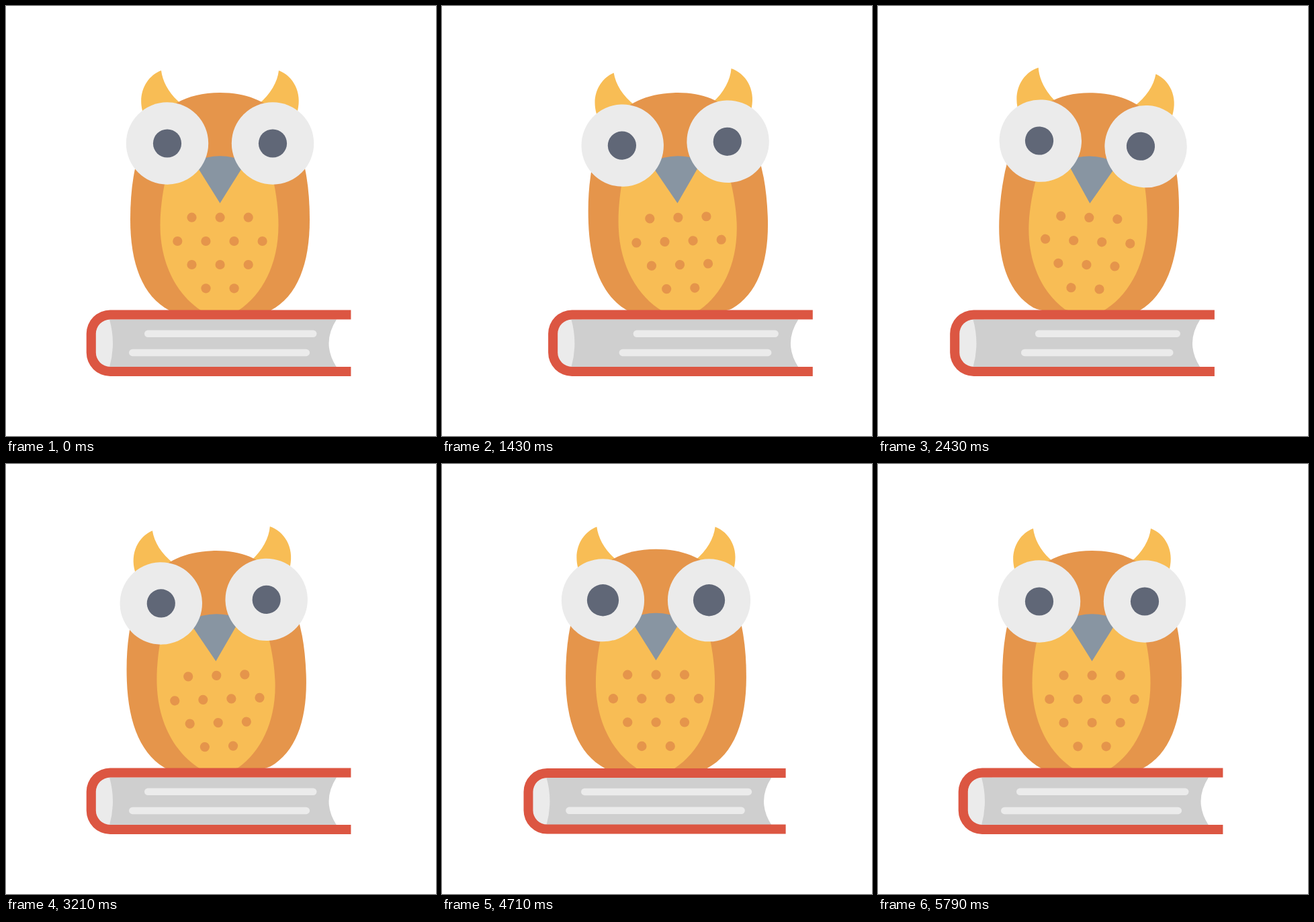
Recreate the animation shown at these times as an HTML page. Size 640 px wide and 640 px high, loop 6 s.

```html
<!DOCTYPE html>
<html lang="en">
<head>
<meta charset="utf-8">
<title>Owl on a book</title>
<style>
  html, body { margin: 0; width: 100%; height: 100%; overflow: hidden; background: #fff; }
  svg { display: block; width: 100%; height: 100%; }
  .orange { fill: #e5954b; }
  .yellow { fill: #f8bd55; }
  .pale { fill: #ebebeb; }
  .pupil { fill: #606777; }
  .rule { stroke: #ebebeb; stroke-width: 10.5; stroke-linecap: round; }
</style>
</head>
<body>
<svg viewBox="0 0 640 640">
  <g id="owl">
    <path id="ear" class="yellow" d="M231 96C210 104 196 128 203 156L250 165L261 146C243 131 233 113 231 96Z"/>
    <use href="#ear" transform="matrix(-1 0 0 1 637 0)"/>
    <path class="orange" d="M318.5 129C222 129 185 205 185 318C185 383 203 432 243 453C265 462 372 462 394 453C434 432 452 383 452 318C452 205 415 129 318.5 129Z"/>
    <path class="yellow" d="M243 235C234 268 229.5 300 229.5 326C229.5 385 255 430 290 453Q318 461 346 453C381 430 405.5 385 405.5 326C405.5 300 401 268 392 235Z"/>
    <g id="dots" class="orange"></g>
    <path fill="#8895a2" d="M280 232Q318.5 214.5 357 232L318.5 293.5Z"/>
    <circle class="pale" cx="240" cy="204.5" r="61.2"/>
    <circle class="pale" cx="397" cy="204.5" r="61.2"/>
    <circle id="pupilL" class="pupil" cy="204.5"/>
    <circle id="pupilR" class="pupil" cy="204.5"/>
  </g>
  <g id="book">
    <path class="pale" d="M170 465H155A23 23 0 0 0 132 488V516A23 23 0 0 0 155 539H170Z"/>
    <path fill="#cfcfcf" d="M154 466.5H492Q469 502 492 537.5H154Q164 502 154 466.5Z"/>
    <line id="ruleA" class="rule" x2="457.2" y1="487.8" y2="487.8"/>
    <line id="ruleB" class="rule" x2="446.8" y1="515.9" y2="515.9"/>
    <path fill="#dc5642" d="M513.4 452.5H155A35.3 35.3 0 0 0 119.7 487.8V515.7A35.3 35.3 0 0 0 155 551H513.4V536.9H155A21.2 21.2 0 0 1 133.8 515.7V487.8A21.2 21.2 0 0 1 155 466.6H513.4Z"/>
  </g>
</svg>
<script>
const LOOP = 6000, STEPS = 84;
const $ = id => document.getElementById(id);

// Belly dots: [first x, y, count]
for (const [x, y, n] of [[276.5, 314.7, 3], [255.3, 350, 4], [276.5, 385, 3], [297.5, 420.3, 2]]) {
  for (let i = 0; i < n; i++) {
    const dot = document.createElementNS('http://www.w3.org/2000/svg', 'circle');
    dot.setAttribute('cx', x + i * 42.1);
    dot.setAttribute('cy', y);
    dot.setAttribute('r', 7.1);
    $('dots').append(dot);
  }
}

const smooth = p => p * p * (3 - 2 * p);

// Cubic ease with handles (.4, 0) and (.5, 1)
function glide(p) {
  let lo = 0, hi = 1;
  for (let i = 0; i < 24; i++) {
    const s = (lo + hi) / 2;
    if (1.2 * s - 0.9 * s * s + 0.7 * s ** 3 < p) lo = s; else hi = s;
  }
  return smooth(lo);
}

// Value at time t along [time, value] keys
function track(keys, ease) {
  return t => {
    if (t <= keys[0][0]) return keys[0][1];
    for (let i = 1; i < keys.length; i++) {
      const [t0, v0] = keys[i - 1], [t1, v1] = keys[i];
      if (t < t1) return v0 + (v1 - v0) * ease((t - t0) / (t1 - t0));
    }
    return keys[keys.length - 1][1];
  };
}

// Tracks sharing the beats of the sliding book
const slide = (...v) =>
  track([0, 820, 1667, 2500, 3150].map((t, i) => [t, v[i]]), glide);
const pop = (peak, dip) =>
  track([[3775, 1], [4433, peak], [4833, dip], [5780, 1]], smooth);

const shift = slide(0, -51.2, 51.3, -13.2, 0);
const lookL = slide(0, -6.4, 0, -1.8, 0);
const lookR = slide(0, -6.5, 0, -7.7, 0);
const rule = slide(1, 0.726, 0.86, 0.842, 1);
const lean = track([[0, 0], [860, 6], [1775, -6], [2620, 4.5], [3250, -2.1], [3780, 0]], smooth);
const owlPop = pop(1.106, 0.98);
const bookPop = pop(1.05, 0.975);
const pupilPop = pop(1.53, 1);

const scaleAt = (s, x, y) => `translate(${x} ${y}) scale(${s}) translate(${-x} ${-y})`;

function draw(t) {
  const dx = shift(t), r = 21.1 * pupilPop(t), k = rule(t);
  $('owl').setAttribute('transform',
    `translate(${dx}) rotate(${lean(t)} 318.5 465) ${scaleAt(owlPop(t), 318.5, 465)}`);
  $('book').setAttribute('transform', `translate(${dx}) ${scaleAt(bookPop(t), 316.6, 501.8)}`);
  $('pupilL').setAttribute('cx', 240 + lookL(t));
  $('pupilR').setAttribute('cx', 397 + lookR(t));
  $('pupilL').setAttribute('r', r);
  $('pupilR').setAttribute('r', r);
  $('ruleA').setAttribute('x1', 462.5 - 256.5 * k + 5.25);
  $('ruleB').setAttribute('x1', 452 - 269 * k + 5.25);
}

// The motion runs at 14 steps per second
const start = performance.now();
function tick() {
  const t = (performance.now() - start) % LOOP;
  draw(Math.floor((t + 5) * STEPS / LOOP) % STEPS * LOOP / STEPS);
  requestAnimationFrame(tick);
}
tick();
</script>
</body>
</html>
```
